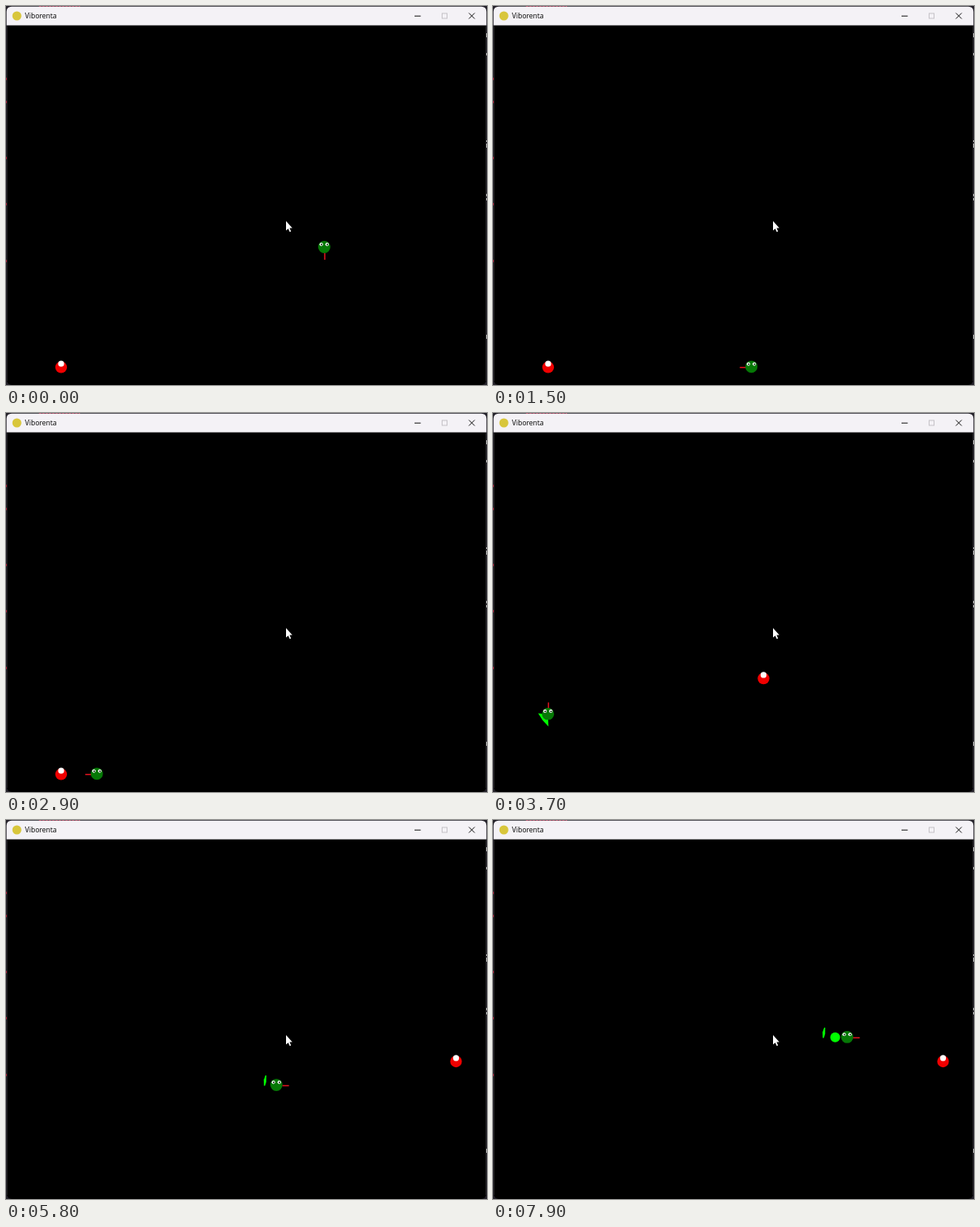
These frames come from a looping animation (584x460 px, 8000 ms). An HTML page:

```html
<!DOCTYPE html>
<html lang="es">
<head>
<meta charset="utf-8">
<style>
  html, body { margin: 0; width: 100%; height: 100%; overflow: hidden; background: #000; }
  svg { display: block; }
  text { font: 8.5px "Open Sans", "Noto Sans", sans-serif; fill: #000; }
</style>
</head>
<body>
<svg width="584" height="460" viewBox="0 0 584 460">
  <!-- desktop edges behind the window -->
  <rect width="584" height="460" fill="#24222a"/>
  <path d="M40 .5H90" stroke="#9c2945" stroke-dasharray="3 1"/>
  <path d="M.5 87v3M.5 115v3M.5 183v3M.5 239v3M.5 308v3" stroke="#a3223b"/>
  <path d="M583.5 33v5M583.5 57v3M583.5 163v2M583.5 167v5M583.5 228v3M583.5 233v3M583.5 399v5" stroke="#bbb"/>

  <!-- window -->
  <rect x="1" y="1" width="582" height="459" rx="6" fill="#000"/>
  <path d="M.7 23.4V7Q.7.7 7 .7H577Q583.3.7 583.3 7V23.4Z" fill="#f4f2f6"/>
  <path d="M1.5 24V455M582.5 24V455" stroke="#303030" stroke-width=".6"/>
  <circle cx="13.2" cy="12" r="5.5" fill="#d8c63c"/>
  <text x="23" y="15.2">Viborenta</text>
  <g fill="none" stroke="#111">
    <path d="M496 12.2h7.5"/>
    <rect x="529.5" y="9" width="6" height="6" stroke="#c6c3c8"/>
    <path d="M562 8.5l7 7m0-7l-7 7"/>
  </g>

  <g id="game"></g>
  <path d="M340 261v11.6l2.7-2.4 1.8 4 1.6-.8-1.8-3.8 3.3-.2z" fill="#fff"/>
</svg>

<script>
const CELL = 14.53, STEP = 100, LOOP = 8000;
const moves = [[0, 1, 10], [-1, 0, 22], [0, -1, 8], [1, 0, 18],
               [0, -1, 2], [-1, 0, 5], [0, -1, 2], [1, 0, 12]];
const apples = [[-22, 10], [-4, 2], [11, 0]];
const meals = [32, 58];          // steps at which an apple is eaten
const stalls = [44, 46, 54, 64]; // steps that show the previous one again

// Every cell the head visits, with the direction it arrived in
const trail = [{ x: 0, y: 0, dx: 0, dy: 1 }];
for (const [dx, dy, count] of moves)
  for (let i = 0; i < count; i++) {
    const { x, y } = trail[trail.length - 1];
    trail.push({ x: x + dx, y: y + dy, dx, dy });
  }

const game = document.getElementById('game');
const at = (x, y, shapes) =>
  `<g transform="translate(${386.4 + x * CELL} ${292.5 + y * CELL})">${shapes}</g>`;
const dot = (x, y, r, fill) => `<circle cx="${x}" cy="${y}" r="${r}" fill="${fill}"/>`;
const eye = x => dot(x, -3.2, 2.1, '#fff') + dot(x + .3, -3, 1, '#052805');

const apple = ([x, y]) => at(x, y, dot(.2, .6, 7.1, '#f00000') + dot(.2, -3.6, 3.6, '#fff'));

const head = ({ x, y, dx, dy }) => at(x, y,
  `<path d="M${.6 + dx * 6.5} ${.9 + dy * 6.5}l${dx * 8.2} ${dy * 8.2}" stroke="#e0141e" stroke-width="1.5"/>` +
  dot(0, 0, 7.4, '#067806') + eye(-3.6) + eye(3.5));

function tail({ x, y }, { dx, dy }) {
  const shape = dy ? 'M.6 .9L-6.4-6.8L-11.9-15.2L0-14Z'
    : dx > 0 ? 'M-.6 1L-.8-6L1.2-11.5H2.4L2.3-4L.8 1Z'
    : 'M.6-1L.8 5L-1.2 9.5H-2.4L-2.3 3L-.8-1Z';
  return at(x, y, `<path d="${shape}" fill="#0f0"/>`);
}

function draw(step) {
  const eaten = meals.filter(m => step >= m).length;
  const length = meals.filter(m => step > m).length;
  let out = apple(apples[eaten]);
  if (length) out += tail(trail[step - length], trail[step - length + 1]);
  for (let i = 1; i < length; i++)
    out += at(trail[step - i].x, trail[step - i].y, dot(0, .3, 6, '#0f0'));
  game.innerHTML = out + head(trail[step]);
}

let shown = -1;
const start = performance.now();
function tick(now) {
  let step = Math.floor(Math.max(0, now - start) % LOOP / STEP);
  if (stalls.includes(step)) step--;
  if (step !== shown) draw(shown = step);
  requestAnimationFrame(tick);
}
draw(0);
requestAnimationFrame(tick);
</script>
</body>
</html>
```
